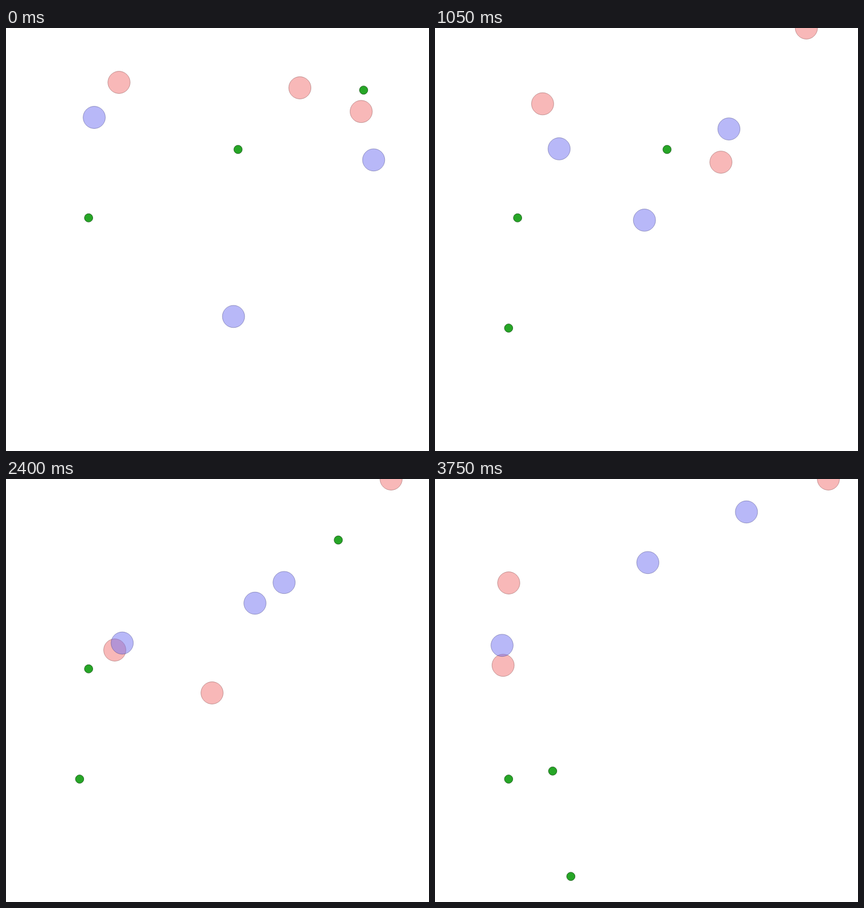
Recreate the animation shown at these times as an HTML page with a canvas. Size 700 by 700 pixels, loop 3900 ms.

```html
<!DOCTYPE html>
<html lang="en">
<head>
<meta charset="utf-8">
<title>Moving discs</title>
<style>
  html, body { margin: 0; width: 100%; height: 100%; overflow: hidden; background: #fff; }
  canvas { display: block; width: 700px; height: 700px; }
</style>
</head>
<body>
<canvas id="stage" width="700" height="700"></canvas>
<script>
const ctx = document.getElementById('stage').getContext('2d');
const STEP = 150, STEPS = 26;
const RED = [242, 115, 115], BLUE = [115, 115, 242], GREEN = [38, 166, 38];

// Waypoints of every disc are reached at these steps.
const KEYS = [0, 5, 9, 12, 16, 20, 25];
const discs = [
  { rgb: RED,  x: [187, 181.4, 177.8, 184, 180, 172, 122], y: [90, 91.3, 174, 242, 283, 229.5, 172] },
  { rgb: RED,  x: [486.3, 475.8, 466, 431.3, 341, 250, 112.7], y: [99, 169.3, 275, 331.3, 354, 327, 308.3] },
  { rgb: RED,  x: [587.8, 605.5, 623.3, 634, 637.3, 646.3, 651], y: [138.2, 36.4, -85, -175, -295, -415, -565] },
  { rgb: BLUE, x: [146, 194.3, 208, 206, 192.3, 160.3, 111], y: [148, 189.5, 211, 243.3, 271.5, 267.5, 275.3] },
  { rgb: BLUE, x: [608.4, 536, 435.6, 384, 412, 438.5, 352.2], y: [218.3, 168.8, 182.5, 215.6, 205.5, 149.5, 138.3] },
  { rgb: BLUE, x: [376.5, 351, 352.3, 382.6, 460.2, 538.3, 515.4], y: [477.4, 380.3, 262.3, 213.2, 171.3, 111, 54.5] }
];

// Dots: x, y, first step, end step.
const dots = [
  [591.8, 102.8, 0, 2], [384, 201, 0, 11], [136.7, 314.2, 0, 24],
  [121.8, 496.6, 2, 26], [549.9, 101, 11, 20], [194.7, 483.3, 20, 26],
  [224.8, 657.7, 24, 26]
];

// Cubic spline with continuous acceleration, starting almost at rest.
function spline(p) {
  const n = p.length - 1;
  const h = i => KEYS[i + 1] - KEYS[i];
  const rate = i => (p[i + 1] - p[i]) / h(i);
  const m = p.map(() => 0);
  m[0] = 0.05 * (p[1] - p[0]);
  for (let pass = 0; pass < 50; pass++) {
    for (let i = 1; i < n; i++) {
      const a = 1 / h(i - 1), b = 1 / h(i);
      m[i] = (3 * (rate(i - 1) * a + rate(i) * b) - m[i - 1] * a - m[i + 1] * b) / (2 * (a + b));
    }
    m[n] = (3 * rate(n - 1) - m[n - 1]) / 2;
  }
  return s => {
    let i = 0;
    while (i < n - 1 && s >= KEYS[i + 1]) i++;
    const u = (s - KEYS[i]) / h(i), v = 1 - u;
    return v * v * ((1 + 2 * u) * p[i] + u * h(i) * m[i])
         + u * u * ((3 - 2 * u) * p[i + 1] - v * h(i) * m[i + 1]);
  };
}

for (const d of discs) {
  d.px = spline(d.x);
  d.py = spline(d.y);
}

function circle(x, y, r, rgb, alpha) {
  ctx.beginPath();
  ctx.arc(x, y, r, 0, 2 * Math.PI);
  ctx.fillStyle = `rgba(${rgb}, ${alpha})`;
  ctx.fill();
  ctx.strokeStyle = `rgba(${rgb.map(c => c >> 1)}, ${alpha})`;
  ctx.lineWidth = 0.8;
  ctx.stroke();
}

function draw(step) {
  ctx.fillStyle = '#fff';
  ctx.fillRect(0, 0, 700, 700);
  // Discs stop at the top wall.
  for (const d of discs) circle(d.px(step), Math.max(0, d.py(step)), 18.4, d.rgb, 0.5);
  for (const [x, y, from, to] of dots) {
    if (step >= from && step < to) circle(x, y, 6.9, GREEN, 1);
  }
}

const start = performance.now();
function tick() {
  draw(Math.floor((performance.now() - start) / STEP) % STEPS);
  requestAnimationFrame(tick);
}
tick();
</script>
</body>
</html>
```
